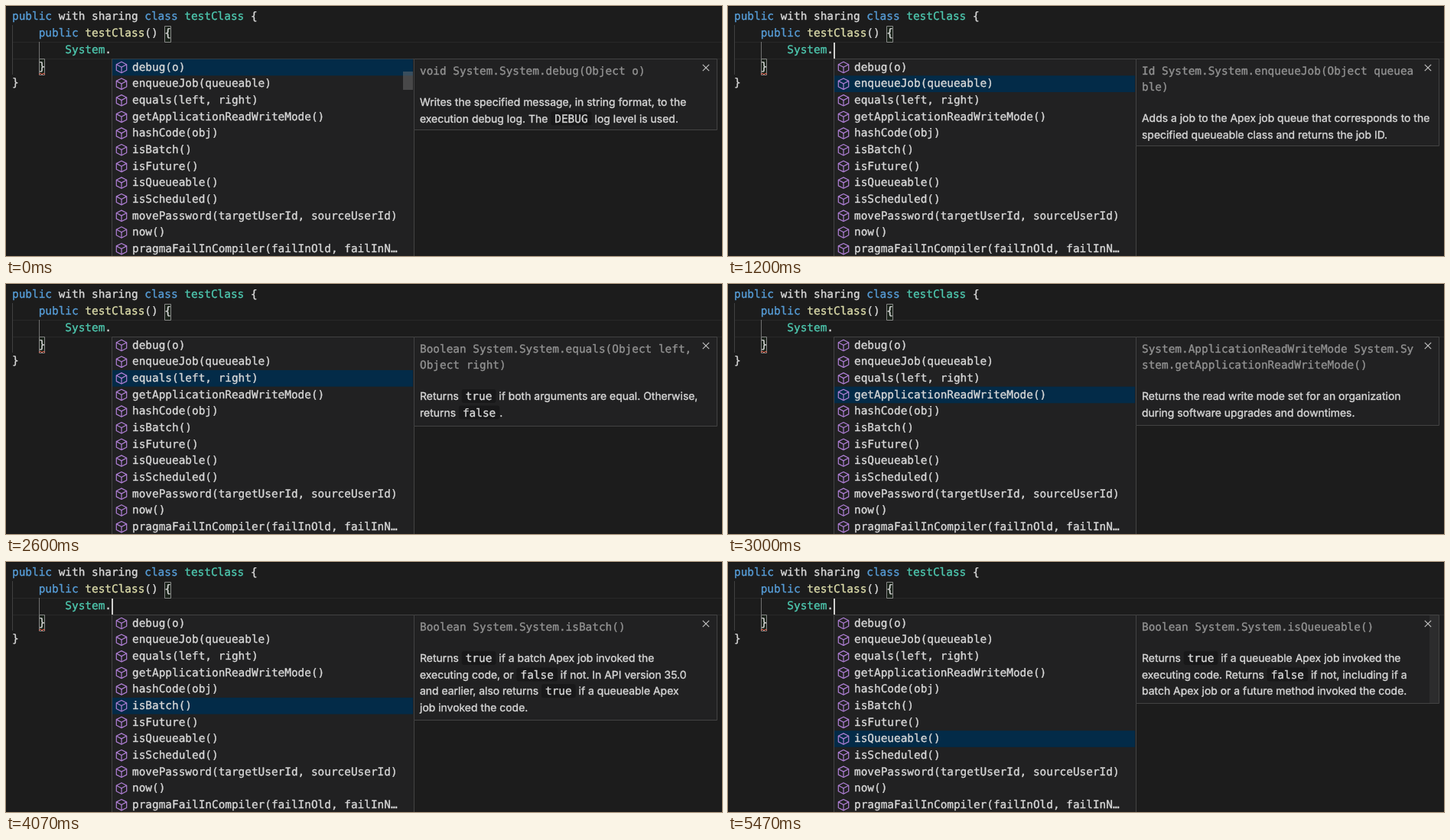
An HTML page with a canvas for the animation above (5.6 s loop, 936 by 328 pixels).

```html
<!DOCTYPE html>
<html lang="en">
<head>
<meta charset="utf-8">
<title>Code completion</title>
<style>
html, body { margin: 0; width: 100%; height: 100%; overflow: hidden; background: #1c1c1c; }
canvas { display: block; }
</style>
</head>
<body>
<canvas id="stage" width="936" height="328"></canvas>
<script>
const ctx = document.getElementById('stage').getContext('2d');
const LOOP = 5600;
const MONO = '14.4px "DejaVu Sans Mono", monospace';
const SANS = '13.94px Inter, sans-serif';
const BLUE = '#569cd6', TEAL = '#4ec9b0', YELLOW = '#dcdcaa', PLAIN = '#d8d8d8';
const EDITOR = '#1c1c1c', WIDGET = '#212122', BORDER = '#434343', SELECTION = '#032b48';
const CHAR = 8.67, LINE = 21.7, ROW = 21.65;

// Each line: starting column, then [text, colour] runs.
const code = [
  [0, ['public', BLUE], [' with sharing ', PLAIN], ['class ', BLUE], ['testClass', TEAL], [' {', PLAIN]],
  [4, ['public ', BLUE], ['testClass', YELLOW], ['() {', PLAIN]],
  [8, ['System', TEAL], ['.', PLAIN]],
  [4, ['}', PLAIN]],
  [0, ['}', PLAIN]]
];

const items = [
  'debug(o)', 'enqueueJob(queueable)', 'equals(left, right)', 'getApplicationReadWriteMode()',
  'hashCode(obj)', 'isBatch()', 'isFuture()', 'isQueueable()', 'isScheduled()',
  'movePassword(targetUserId, sourceUserId)', 'now()', 'pragmaFailInCompiler(failInOld, failInN…'
];

// One entry per selected item; backticks mark inline code.
const docs = [
  { at: 0, bottom: 163, title: ['void System.System.debug(Object o)'],
    body: ['Writes the specified message, in string format, to the',
           'execution debug log. The `DEBUG` log level is used.'] },
  { at: 1200, bottom: 184, title: ['Id System.System.enqueueJob(Object queuea', 'ble)'],
    body: ['Adds a job to the Apex job queue that corresponds to the',
           'specified queueable class and returns the job ID.'] },
  { at: 2130, bottom: 187, title: ['Boolean System.System.equals(Object left,', 'Object right)'],
    body: ['Returns `true` if both arguments are equal. Otherwise,', 'returns `false`.'] },
  { at: 3000, bottom: 186,
    title: ['System.ApplicationReadWriteMode System.Sy', 'stem.getApplicationReadWriteMode()'],
    body: ['Returns the read write mode set for an organization',
           'during software upgrades and downtimes.'] },
  { at: 3470, bottom: 163, title: ['Integer System.System.hashCode(Object ob', 'j)'],
    body: ['Returns the hash code of the specified object.'] },
  { at: 4000, bottom: 208, title: ['Boolean System.System.isBatch()'],
    body: ['Returns `true` if a batch Apex job invoked the',
           'executing code, or `false` if not. In API version 35.0',
           'and earlier, also returns `true` if a queueable Apex',
           'job invoked the code.'] },
  { at: 4670, bottom: 186, title: ['Boolean System.System.isFuture()'],
    body: ['Returns `true` if the currently executing code is invoked',
           'by code contained in a method annotated with future;', '`false` otherwise.'] },
  { at: 5400, bottom: 186, title: ['Boolean System.System.isQueueable()'],
    body: ['Returns `true` if a queueable Apex job invoked the',
           'executing code. Returns `false` if not, including if a',
           'batch Apex job or a future method invoked the code.'] }
];

function rect(x, y, w, h, color) {
  ctx.fillStyle = color;
  ctx.fillRect(x, y, w, h);
}

function frame(x, y, w, h, fill, border) {
  rect(x, y, w, h, fill);
  ctx.strokeStyle = border;
  ctx.lineWidth = 1;
  ctx.strokeRect(x + 0.5, y + 0.5, w - 1, h - 1);
}

function path(points, color, width) {
  ctx.beginPath();
  for (const [x, y] of points) ctx.lineTo(x, y);
  ctx.strokeStyle = color;
  ctx.lineWidth = width;
  ctx.stroke();
}

// Draws slightly thickened text and returns the x where it ends.
function text(str, x, y, color, font = MONO) {
  const baseline = Math.round(y);
  ctx.font = font;
  ctx.fillStyle = ctx.strokeStyle = color;
  ctx.lineWidth = 0.35;
  ctx.fillText(str, x, baseline);
  ctx.strokeText(str, x, baseline);
  return x + ctx.measureText(str).width;
}

function drawEditor(cursorOn) {
  rect(0, 0, 936, 328, EDITOR);
  rect(0, 0, 936, 1, '#111');
  rect(8, 47, 928, 1, '#292929');
  rect(8, 69, 928, 1, '#292929');
  rect(8, 25, 1, 65, '#404040');
  rect(43, 47, 1, 22, '#707070');
  frame(207, 26, 9, 22, '#1a231a', '#888');
  frame(43, 69, 8, 22, '#1a231a', '#888');
  code.forEach(([column, ...runs], i) => {
    let x = 8 + column * CHAR;
    for (const [str, color] of runs) x = text(str, x, 18.4 + i * LINE, color);
  });
  path([[43, 90], [45, 88], [47, 90], [49, 88], [51, 90]], '#f4604f', 1);
  if (cursorOn) rect(138, 48, 2, 21, '#d0d0ce');
}

function drawCube(x, y) {
  const color = '#b180d7', side = 6.7;
  path([[x, y - 7.2], [x + side, y - 3.8], [x + side, y + 3.8], [x, y + 7.2],
        [x - side, y + 3.8], [x - side, y - 3.8], [x, y - 7.2], [x + side, y - 3.8]], color, 1.2);
  path([[x - side, y - 3.8], [x, y - 0.2], [x + side, y - 3.8]], color, 1.2);
  path([[x, y - 0.2], [x, y + 7.2]], color, 1.2);
}

function drawList(selected, thumbAlpha) {
  frame(138, 69, 396, 270, WIDGET, BORDER);
  rect(139, 69.7 + selected * ROW, 393, ROW, SELECTION);
  items.forEach((label, i) => {
    drawCube(151, 80.5 + i * ROW);
    text(label, 165, 84.8 + i * ROW, PLAIN);
  });
  rect(519, 86, 13, 24, `rgba(121, 121, 121, ${0.45 * thumbAlpha})`);
}

function drawDocLine(line, x, y) {
  line.split('`').forEach((part, i) => {
    if (i % 2 === 0) {
      x = text(part, x, y, '#d8d8d8', SANS);
      return;
    }
    const width = part.length * CHAR + 10;
    ctx.fillStyle = '#181819';
    ctx.beginPath();
    ctx.roundRect(x, y - 14, width, 18, 3);
    ctx.fill();
    text(part, x + 5, y, PLAIN);
    x += width;
  });
}

function drawDoc(doc, barAlpha) {
  frame(533, 69, 397, doc.bottom - 69, WIDGET, BORDER);
  rect(917, 70, 12, doc.bottom - 71, `rgba(121, 121, 121, ${barAlpha})`);
  doc.title.forEach((line, i) => text(line, 541, 89.6 + i * 21, '#929292'));
  const top = 110 + doc.title.length * 21;
  doc.body.forEach((line, i) => drawDocLine(line, 541, top + i * 21.6));
  path([[910.8, 76.8], [919.2, 85.2]], '#c5c5c5', 1.1);
  path([[919.2, 76.8], [910.8, 85.2]], '#c5c5c5', 1.1);
}

function draw() {
  const t = performance.now() % LOOP;
  const selected = docs.findLastIndex(doc => t >= doc.at);
  ctx.textRendering = 'geometricPrecision';
  ctx.lineJoin = 'round';
  drawEditor(t >= 70 && (t - 70) % 1000 < 530);
  drawList(selected, Math.max(0, 1 - t / 870));
  drawDoc(docs[selected], t < 4670 ? 0 : t < 4730 ? 0.03 : 0.12);
  requestAnimationFrame(draw);
}

draw();
</script>
</body>
</html>
```
